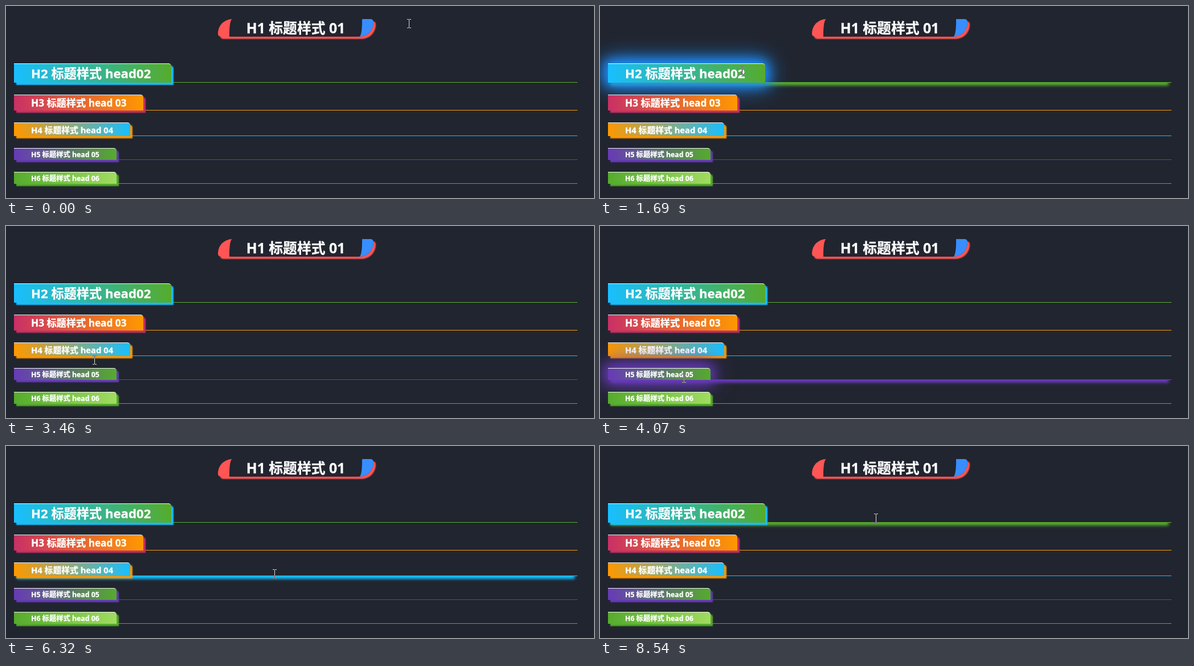
Recreate the animation shown at these times as an HTML page. Size 1032 px wide and 338 px high, loop 8740 ms.

```html
<!DOCTYPE html>
<html lang="zh-CN">
<head>
<meta charset="utf-8">
<style>
:root { --bg: #21252f; --red: #ff5555; --blue: #18bfff; --green: #55ab2d; --orange: #ff9800; --pink: #c93065; --purple: #673ab7; }
html, body { margin: 0; width: 100%; height: 100%; overflow: hidden; background: var(--bg); }
#stage { position: relative; box-sizing: border-box; width: 1032px; height: 338px; padding: 23px 29px 0 14px;
  overflow: hidden; background: var(--bg); color: #fff; white-space: nowrap; -webkit-text-stroke: .3px;
  font-family: "Open Sans", "Noto Sans", "Noto Sans CJK SC", sans-serif; }
h1, h2, h3, h4, h5, h6 { box-sizing: border-box; position: relative; font-weight: bold; margin: 0 0 21px;
  height: var(--h); line-height: var(--h); border-bottom: 1px solid var(--line); }
h1 { --h: 31px; width: fit-content; margin: 0 auto 47px; padding: 0 30px; font-size: 24.8px;
  border: solid var(--red); border-width: 0 20px; border-right-color: #388eff; border-radius: 25px 5px;
  box-shadow: 4px 4px 2px var(--red); }
h2 { --h: 34px; font-size: 22.2px; --from: var(--blue); --to: var(--green); --line: var(--green); --glow: #1e90ff; }
h3 { --h: 28px; font-size: 17.2px; --from: var(--pink); --to: var(--orange); --line: var(--orange); }
h4 { --h: 24px; font-size: 14.8px; --from: var(--orange); --to: var(--blue); --line: var(--blue); }
h5 { --h: 21px; font-size: 12.3px; --from: var(--purple); --to: var(--green); --line: var(--purple); }
h6 { --h: 21px; font-size: 12.3px; --from: var(--green); --to: #a0dc60; --line: var(--green); }
span { position: absolute; left: 0; top: 0; bottom: -1px; box-sizing: border-box; padding: 0 30px; white-space: pre;
  border-top: 1px solid #f2f4f2; border-radius: 0 5px 0 0;
  background: linear-gradient(90deg, var(--from), var(--to)); box-shadow: 4px 4px 2px var(--from); }
h1.hot { box-shadow: 0 0 10px var(--red), 0 0 25px var(--red); }
.hot:not(h1, span) { box-shadow: 0 10px 5px -5px var(--line); }
span.hot { box-shadow: 0 0 20px 5px var(--glow, var(--from)), 0 0 40px 5px var(--glow, var(--from)); }
#cursor { position: absolute; left: 0; top: 0; mix-blend-mode: difference; }
</style>
</head>
<body>
<div id="stage">
  <h1>H1 标题样式 01</h1>
  <h2><span>H2 标题样式 head02 </span></h2>
  <h3><span>H3 标题样式 head 03</span></h3>
  <h4><span>H4 标题样式 head 04</span></h4>
  <h5><span>H5 标题样式 head 05</span></h5>
  <h6><span>H6 标题样式 head 06</span></h6>
  <svg id="cursor" width="7" height="16" fill="none" stroke="#fff"><path d="M0 .5h3m1 0h3M3.5 1v14M0 15.5h3m1 0h3"/></svg>
</div>
<script>
const LOOP = 8740, STEP = 70, GLIDE = 4;
const cursor = document.getElementById('cursor');
const headings = document.querySelectorAll('h1, h2, h3, h4, h5, h6');
const labels = document.querySelectorAll('span');

// pointer stops: departure time, x, y
const stops = [
  [440, 560, 40], [1410, 249, 113], [2360, 160, 179], [2970, 160, 218],
  [3460, 147, 268], [4410, 165, 305], [4950, 439, 305], [5770, 456, 263],
  [6180, 473, 220], [6720, 480, 172], [7200, 483, 133], [8410, 484, 123]
];

function pointerAt(t) {
  let x = 707, y = 31;
  for (const [start, endX, endY] of stops) {
    if (t < start) break;
    const p = Math.min(1, (Math.floor((t - start) / STEP) + 1) / GLIDE);
    const ease = 1 - (1 - p) ** 1.5;
    x += (endX - x) * ease;
    y += (endY - y) * ease;
  }
  return [Math.round(x), Math.round(y)];
}

function draw(t) {
  const [x, y] = pointerAt(t);
  cursor.style.transform = `translate(${x - 3}px, ${y - 8}px)`;
  for (const el of [...headings, ...labels]) {
    const box = el.getBoundingClientRect();
    el.classList.toggle('hot', x >= box.left && x < box.right && y >= box.top && y < box.bottom);
  }
}

const begin = performance.now();
function tick() {
  draw((performance.now() - begin) % LOOP);
  requestAnimationFrame(tick);
}
tick();
</script>
</body>
</html>
```
